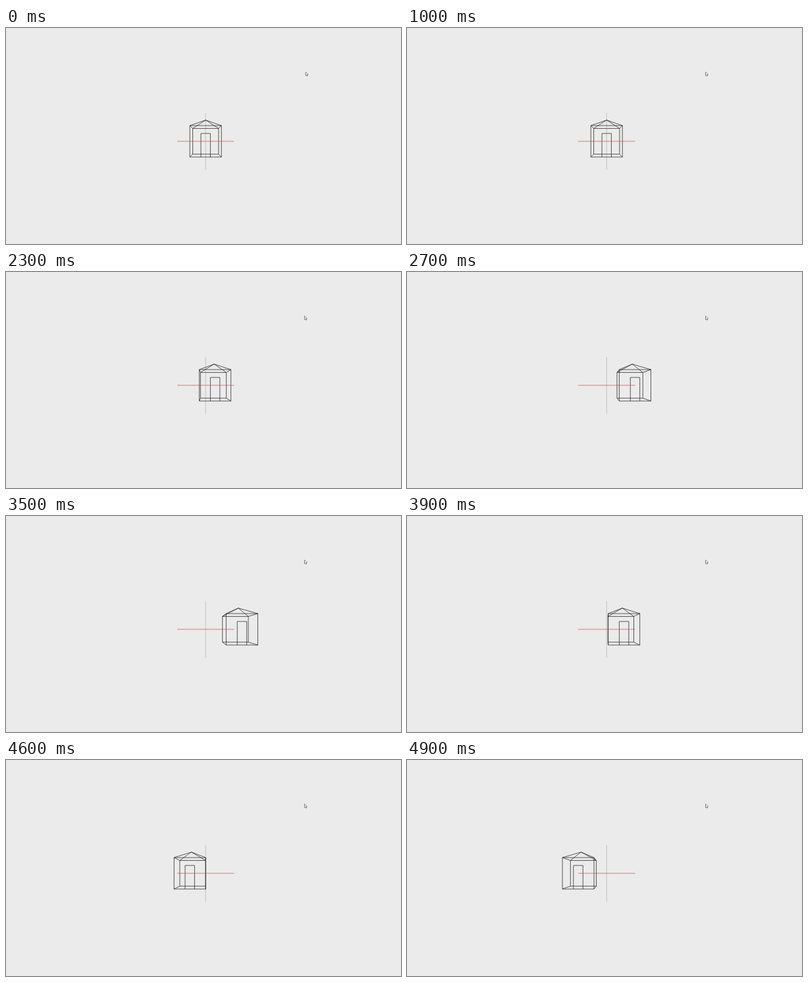
Recreate the animation shown at these times as an HTML page with a canvas. Size 600 by 330 pixels, loop 5000 ms.

```html
<!DOCTYPE html>
<html lang="en">
<head>
<meta charset="utf-8">
<title>Wireframe house</title>
<style>
  html, body { margin: 0; width: 100%; height: 100%; overflow: hidden; background: #ecebec; }
  canvas { display: block; }
</style>
</head>
<body>
<canvas id="stage" width="600" height="330"></canvas>
<script>
const ctx = document.getElementById('stage').getContext('2d');
const LOOP = 5000, FOCAL = 216, DISTANCE = 10;
const CENTER_X = 303.25, CENTER_Y = 173.1;

function project([x, y, z]) {
  const scale = FOCAL / (DISTANCE + z);
  return [CENTER_X + x * scale, CENTER_Y - y * scale];
}

function drawPath(points, color, closed = false) {
  ctx.beginPath();
  points.forEach(p => ctx.lineTo(...project(p)));
  if (closed) ctx.closePath();
  ctx.strokeStyle = color;
  ctx.stroke();
}

// A tap to the right, a held key after the repeat delay, then a held key to the left.
function houseOffset(time) {
  const tick = Math.floor(time / 100);
  if (tick < 17) return 0;
  if (tick < 22) return 0.1;
  if (tick < 35) return Math.min(24, 3 * (tick - 21)) / 10;
  return Math.max(-18, 23 - 3 * (tick - 35)) / 10;
}

function drawHouse(dx) {
  const ink = '#181818';
  const square = z => [[-1, 1], [1, 1], [1, -1], [-1, -1]].map(([x, y]) => [x + dx, y, z]);
  const front = square(-1), back = square(1), apex = [dx, 1.5, 0];

  drawPath(back, ink, true);
  front.forEach((corner, i) => {
    drawPath([corner, back[i]], ink);
    if (corner[1] > 0) {
      drawPath([apex, corner], ink);
      drawPath([apex, back[i]], ink);
    }
  });
  drawPath(front, ink, true);
  drawPath([[-0.3, -1], [-0.3, 0.5], [0.3, 0.5], [0.3, -1]].map(([x, y]) => [x + dx, y, -1]), ink);
}

function drawPointer(x, y) {
  const outline = [[0, 0], [0, 5.5], [1.3, 4.4], [2.1, 6.2], [3, 5.8], [2.3, 4], [4, 3.9]];
  ctx.beginPath();
  outline.forEach(([px, py]) => ctx.lineTo(x + px, y + py));
  ctx.closePath();
  ctx.fillStyle = '#fff';
  ctx.fill();
  ctx.strokeStyle = '#555';
  ctx.stroke();
}

function draw(time) {
  ctx.fillStyle = '#ecebec';
  ctx.fillRect(0, 0, 600, 330);
  ctx.lineWidth = 0.7;
  ctx.lineJoin = 'bevel';
  drawPath([[0, -2, 0], [0, 2, 0]], '#b4b4b4');
  drawHouse(houseOffset(time));
  drawPath([[-2, 0, 0], [2, 0, 0]], '#ff3038');
  drawPointer(time < 200 ? 455.2 : time < 1000 ? 454.2 : 453.5, 67.3);
}

const start = performance.now();
function frame() {
  draw((performance.now() - start) % LOOP);
  requestAnimationFrame(frame);
}
frame();
</script>
</body>
</html>
```
